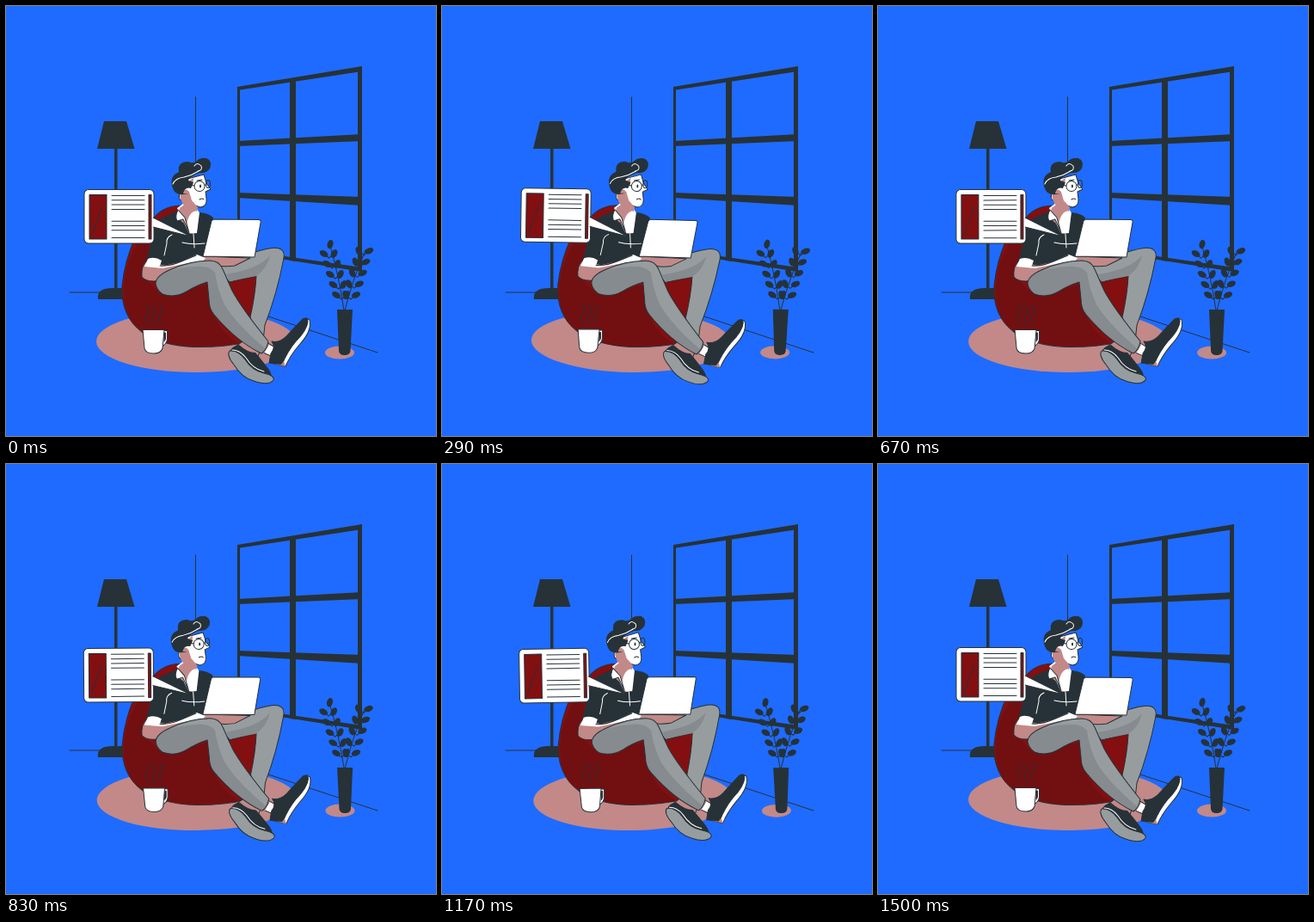
An HTML page for the animation above (1.54 s loop, 500 px wide and 500 px high).

```html
<!DOCTYPE html>
<html lang="en">
<head>
<meta charset="utf-8">
<title>Reading at home</title>
<style>
  html, body { margin: 0; height: 100%; overflow: hidden; background: #1f6bff; }
  svg { display: block; width: 100vw; height: 100vh; }
  .dark { fill: #263238; }
  .white { fill: #fff; }
  .pink { fill: #c28988; }
  .red { fill: #830f11; }
  .grey { fill: #979d9f; }
  .shade { fill: #858b8e; }
  .edge { stroke: #263238; stroke-linejoin: round; }
  .line { fill: none; stroke: #263238; stroke-linecap: round; }
  .light { fill: none; stroke: #fff; stroke-linecap: round; }
</style>
</head>
<body>
<svg viewBox="0 0 500 500">
  <!-- room -->
  <path class="line" d="M220.500 106V182M74 333H110M296 358L432 403"/>
  <g class="dark">
    <path d="M269 94L414 70V76L269 98Z"/>
    <path d="M269 157L414 149V157L269 163Z"/>
    <path d="M269 217L414 222V232L269 223Z"/>
    <path d="M269 283L414 304V309L269 286Z"/>
    <path d="M269 94H272V286H269ZM330 86H337V297L330 296ZM409 72L414 70V309L409 308Z"/>
    <path d="M114 134H140L149.500 166H106ZM126 165H129.500V329H126ZM107 341Q105 328 124 328H142V341Z"/>
  </g>

  <g id="plant">
    <ellipse class="pink" cx="388" cy="403" rx="17" ry="7.500"/>
    <path class="line" d="M393 354Q388 318 377 279M394 354Q403 318 418 284"/>
    <g id="leaves"></g>
    <path class="dark" d="M385 353H403L400.500 401Q400 406 393.500 406Q387.500 406 387 401Z"/>
  </g>

  <g id="reader">
    <ellipse class="pink" cx="221" cy="390" rx="116" ry="36"/>

    <!-- beanbag -->
    <path class="red edge" d="M172 246Q184 232 204 232L230 262L301 300V365Q300 384 280 391Q252 397 220 396.500Q180 395 158 379Q133 360 135 325Q138 296 150 270Z"/>
    <path fill="#720f11" d="M172 250Q150 275 140 305Q132 345 146 367Q164 389 205 395Q238 397 270 392Q236 372 235 324L180 335L160 315Z"/>

    <!-- far leg -->
    <path class="grey edge" d="M245 304Q285 285 309 281.500Q325 280 323 293Q315 335 301 371L298 398L284 362Q290 335 291 314Q275 317 260 321Z"/>
    <path class="shade" d="M260 320L291 314Q304 305 307 290Q294 306 256 312Z"/>

    <!-- lower shoe -->
    <path class="pink edge" d="M268 395L279 387L295 402L291 413Z"/>
    <path class="dark" d="M260 402Q263 395 271 394Q281 403 290 403Q297 411 303 419Q309 426 309 432L284 424Z"/>
    <path class="grey edge" d="M260 401Q256 406 265 417Q274 432 288 436Q305 442 311 435Q313 430 300 427Q286 424 278 411Q270 400 260 401Z"/>
    <path class="light" d="M263 400Q272 400 279 409Q287 422 300 425"/>

    <!-- upper shoe -->
    <path class="white edge" d="M301 390L313 397L308 407L297 402Z"/>
    <path class="white edge" d="M312 416L325 419Q330 407 341 394Q356 378 353 365L349 363Z"/>
    <path class="dark edge" d="M308 404Q314 397 309 390Q318 392 326 384Q337 372 345 364Q351 361 351 367Q350 377 337 390Q327 402 321 417L306 415Z"/>
    <path class="pink" d="M302 391L306 394L300 404L297 401ZM312 416L320 417L323 413L325 419Z"/>

    <!-- shirt and arms -->
    <path class="white" d="M199 235L211 226L222 236L226 242L222 266L212 264Z"/>
    <path class="pink" d="M202 235L211 228L221 238Q212 240 210 255L199 247Z"/>
    <path class="dark" d="M200 238L182 246Q173 252 171 266L162 300L185 303L219 295L232 291L241 246Q236 241 225 240L222 264L213 265L207 253Q198 247 200 238Z"/>
    <path class="white edge" d="M200 237Q196 245 199 250L206 248L213 264L208 246Z"/>
    <path class="light" d="M193 266Q186 269 187 276L184 290M205 275Q216 278 231 276M218 265L219 281"/>
    <path class="pink edge" d="M163 297Q157 303 158 315Q164 322 180 319L216 303L229 300Q253 304 266 302L284 293L230 291L185 301Z"/>
    <path class="white" d="M165 294Q173 291 181 296L179 302Q189 303 202 298L222 289L232 293L228 298L211 299L182 305L161 303Z"/>
    <path class="line" d="M179 302Q190 303 204 297L221 290"/>

    <!-- near leg -->
    <path id="leg" class="shade edge" d="M174 323Q174 314 190 307Q214 296 237 296Q248 296 252 306L263 331Q273 350 305 390Q304 399 297 404Q268 390 242 359Q236 352 236 341L234 321Q221 325 210 332Q196 340 182 335Q175 330 174 323Z"/>
    <path class="grey" d="M186 310Q214 297 237 297Q247 297 251 306L262 331Q272 350 304 390L301 398Q268 370 254 347Q246 330 243 310Q236 301 219 303Q200 304 186 310Z"/>

    <!-- head -->
    <path class="white edge" d="M211 201L230 196L233 206L238 213L232 216L233 224Q234 233 226 234L214 230L202 225Q200 218 205 215Z"/>
    <path class="pink" d="M203 217Q208 210 213 216L216 226L223 234L222 239L208 233Q201 225 203 217ZM212 204L218 200L217 210Z"/>
    <path class="dark" d="M194 212Q189 198 201 193Q199 181 212 181Q218 184 222 180Q226 176 233 177Q240 180 237.500 188Q234 195 225 194Q212 199 212 203L218 205L215 212Q208 210 206 218L212 218Q197 222 194 212Z"/>
    <path class="light" d="M194 207Q197 200 207 199Q216 197 224 192M219 186Q222 181 227 186Q229 191 223 192"/>
    <g class="line">
      <circle cx="225" cy="209.500" r="6"/>
      <ellipse cx="235" cy="207" rx="2.500" ry="4.500"/>
      <path d="M214 208L219 209M231 208H233M225 225Q228 223 230 225M222 203L228 202"/>
    </g>
    <ellipse class="dark" cx="226" cy="209.500" rx="1" ry="2"/>

    <!-- laptop -->
    <path class="white edge" d="M242 248L294 248.500Q297 249 296 252L289 292L229 291L239 250Q240 248 242 248Z"/>

    <!-- mug -->
    <g id="steam" class="line"></g>
    <path class="white edge" fill-rule="evenodd" d="M183 377.500H187.500V387Q187 393 181 396ZM184 380V390L185.500 387V380Z"/>
    <path class="white edge" d="M159 376.500H184L182 398Q180 404 172 404Q162 404 161 398Z"/>

    <!-- tablet -->
    <rect class="white edge" x="91" y="213.500" width="81" height="62.500" rx="5"/>
    <path class="white edge" d="M171 246L215 268L171 257"/>
    <path class="red edge" d="M97 219.500H117V271H97ZM166 219.500H169V271H166Z"/>
    <path class="line" d="M100 266L112 233"/>
    <g id="text" class="line"></g>
  </g>
</svg>
<script>
  const LOOP = 1540, SWING = 1500, LEAD = 50;
  const el = id => document.getElementById(id);
  const repeat = (count, make) => Array.from({ length: count }, (_, i) => make(i)).join("");

  function leaf(x, y, tilt) {
    return `<ellipse class="dark" rx="3.4" ry="5.3" transform="translate(${x} ${y}) rotate(${tilt})"/>`;
  }

  // Pairs of leaves on short stalks, from the lowest pair upwards
  function branch(x, y, dx, dy, lean) {
    return repeat(5, i => {
      const px = x + dx * i, py = y + dy * i;
      return `<path class="line" d="M${px - 6} ${py}L${px} ${py + 5}L${px + 6} ${py}"/>`
        + leaf(px - 6, py, lean - 45) + leaf(px + 6, py, lean + 45);
    });
  }
  el("leaves").innerHTML = branch(390, 336, -3.6, -12, -15) + leaf(377, 277, 15)
    + branch(401, 336, 3.8, -12.8, 22);

  el("steam").innerHTML = repeat(3, i =>
    `<path d="M${165 + 8 * i} ${369 + i % 2 * 2}q-6 -6 -1 -11t-1 -11"/>`);

  // Two paragraphs, the second with a gap before its last line
  el("text").innerHTML = repeat(8, i => {
    const y = 220.5 + 5.3 * i + (i > 3 ? 8.5 : 0) + (i > 6 ? 3.5 : 0);
    return `<path d="M123 ${y}H161"/>`;
  });

  // Triangle wave between -1 and 1 degree
  function swing(ms) {
    const p = ((ms + LEAD) / SWING + 0.25) % 1;
    return 1 - 4 * Math.abs(p - 0.5);
  }

  function draw(now) {
    const angle = swing(now % LOOP) - swing(0);
    el("reader").setAttribute("transform", `rotate(${angle} 222 308)`);
    el("plant").setAttribute("transform", `rotate(${angle} 397 341)`);
    requestAnimationFrame(draw);
  }
  draw(performance.now());
</script>
</body>
</html>
```
